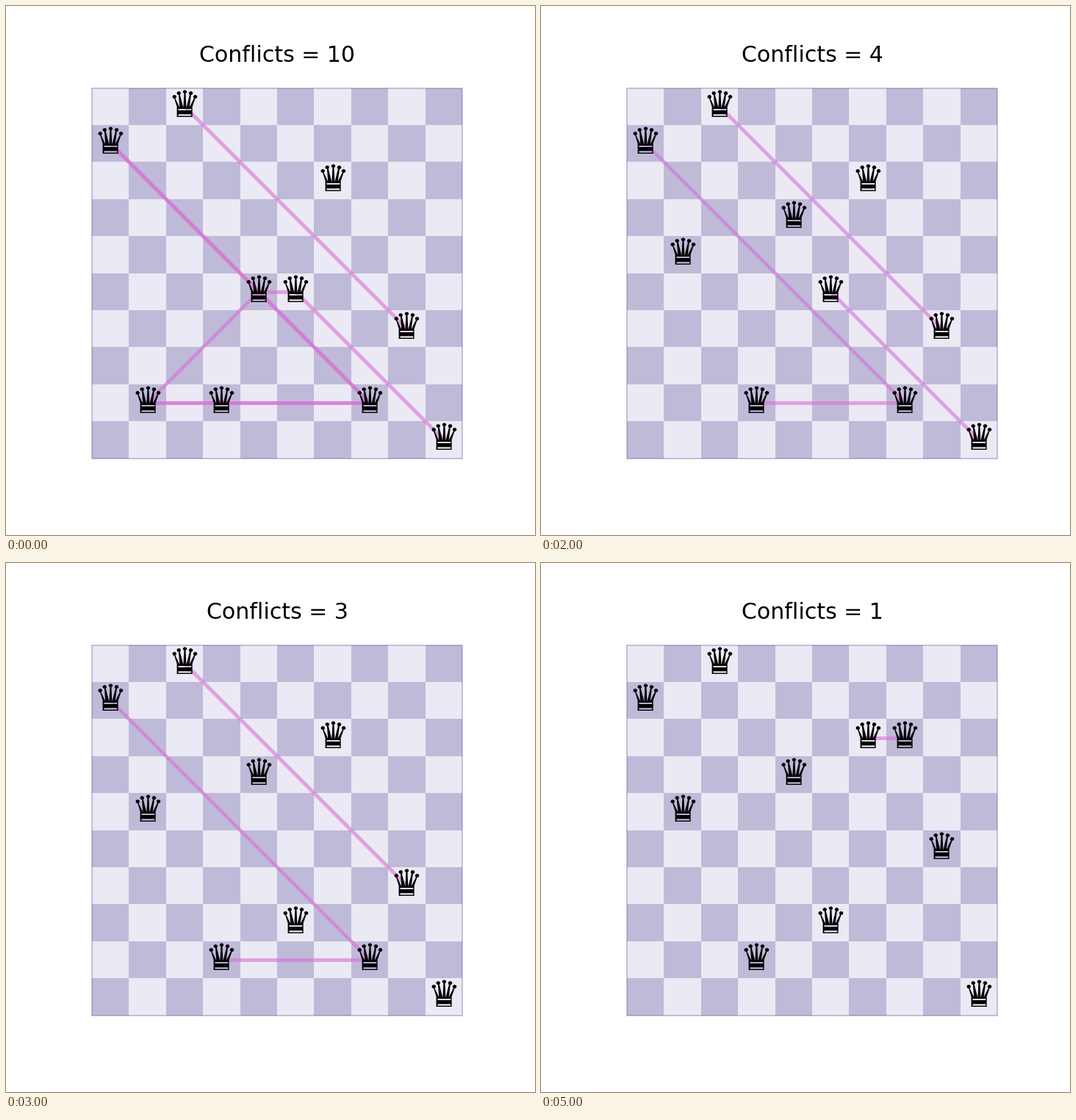
A matplotlib script for the animation above (6 s loop, 720 by 720 pixels).

```python
from itertools import combinations

import matplotlib.pyplot as plt
from matplotlib.animation import FuncAnimation
from matplotlib.patches import Rectangle

N = 10
START = [1, 8, 0, 8, 5, 5, 2, 8, 6, 9]               # row of the queen in each column
MOVES = [(4, 3), (1, 4), (5, 7), (7, 2), (8, 5)]     # (column, new row)
DARK, LIGHT = "#bfbad8", "#ebe9f4"

plt.rcParams["font.family"] = "DejaVu Sans"
fig, ax = plt.subplots(figsize=(6, 6), dpi=120)
ax.set_aspect("equal")
ax.set_xlim(-0.5, N + 0.5)
ax.set_ylim(N + 0.5, -0.5)
ax.axis("off")

for row in range(N):
    for col in range(N):
        color = DARK if (row + col) % 2 else LIGHT
        ax.add_patch(Rectangle((col, row), 1, 1, fc=color, lw=0))
ax.add_patch(Rectangle((0, 0), N, N, fill=False, ec="darkslateblue", lw=1, alpha=0.35))

title = ax.set_title("", fontsize=18)
queens = [ax.text(col + 0.5, 0, "♛", fontsize=30, ha="center", va="center")
          for col in range(N)]
links = []


def board_after(steps):
    rows = START.copy()
    for col, row in MOVES[:steps]:
        rows[col] = row
    return rows


def attacks(rows):
    return [(a, b) for a, b in combinations(range(N), 2)
            if abs(rows[a] - rows[b]) in (0, b - a)]


def draw(step):
    while links:
        links.pop().remove()
    rows = board_after(step)
    pairs = attacks(rows)
    for a, b in pairs:
        links.extend(ax.plot([a + 0.5, b + 0.5], [rows[a] + 0.5, rows[b] + 0.5],
                             color="orchid", lw=3, alpha=0.6))
    for queen, row in zip(queens, rows):
        queen.set_y(row + 0.5)
    title.set_text(f"Conflicts = {len(pairs)}")
    return [title, *queens, *links]


anim = FuncAnimation(fig, draw, frames=len(MOVES) + 1, init_func=lambda: draw(0),
                     interval=1000, repeat=True, repeat_delay=0)
plt.show()
```
